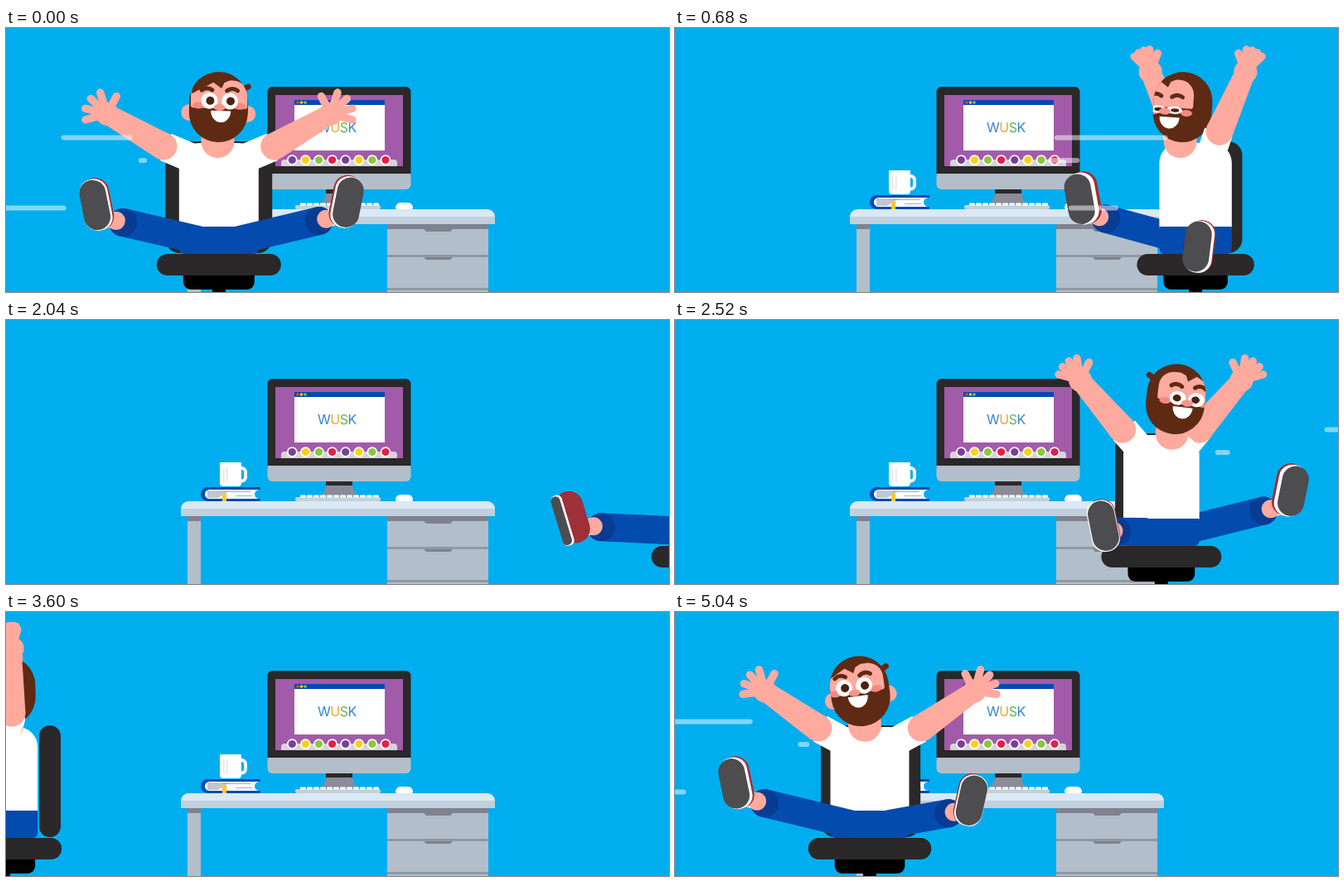
Write an HTML page with a canvas that moves like this. It is 800 px wide and 319 px high and loops after 5.08 s.

```html
<!DOCTYPE html>
<html lang="en">
<head>
<meta charset="utf-8">
<title>Office chair spin</title>
<style>
html, body { margin: 0; width: 100%; height: 100%; overflow: hidden; background: #00aeef; }
canvas { display: block; }
</style>
</head>
<body>
<canvas id="stage" width="800" height="319"></canvas>
<script>
const ctx = document.getElementById('stage').getContext('2d');
const LOOP = 5080, RAD = Math.PI / 180;
const SKY = '#00aeef', DARK = '#2a2829', BLUE = '#034bae', CUFF = '#073c92', SKIN = '#ffaa9f',
  HAIR = '#5e2a14', RED = '#9e3038', SOLE = '#4d4c4e', METAL = '#b2bfca';
const clamp = (v, lo, hi) => Math.min(hi, Math.max(lo, v));

function box(color, x, y, w, h, r = 0) {
  ctx.fillStyle = color;
  ctx.beginPath();
  ctx.roundRect(x, y, w, h, r);
  ctx.fill();
}

function oval(color, x, y, rx, ry = rx, from = 0, to = 2 * Math.PI) {
  ctx.fillStyle = color;
  ctx.beginPath();
  ctx.ellipse(x, y, rx, ry, 0, from, to);
  ctx.fill();
}

function poly(color, ...xy) {
  ctx.fillStyle = color;
  ctx.beginPath();
  for (let i = 0; i < xy.length; i += 2) ctx.lineTo(xy[i], xy[i + 1]);
  ctx.closePath();
  ctx.fill();
}

function line(color, width, x1, y1, x2, y2, cap = 'round') {
  ctx.strokeStyle = color;
  ctx.lineWidth = width;
  ctx.lineCap = cap;
  ctx.beginPath();
  ctx.moveTo(x1, y1);
  ctx.lineTo(x2, y2);
  ctx.stroke();
}

function drawMonitor() {
  box(DARK, 315.5, 71, 173, 112, 6);
  box(METAL, 315.5, 176, 173, 19, [0, 0, 6, 6]);
  box('#a15ba8', 325, 81, 154, 86);
  box('#fff', 348, 87, 109, 61);
  box(BLUE, 348, 87, 109, 6);
  ['#ef4136', '#fdd017', '#8cc63f'].forEach((c, i) => oval(c, 352 + i * 4.5, 90, 1.8));

  ctx.font = '400 16px Inter, sans-serif';
  let x = 376;
  [...'WUSK'].forEach((ch, i) => {
    ctx.fillStyle = ['#2f86d6', '#f2a51f', '#5cb848', '#2f86d6'][i];
    ctx.fillText(ch, x, 125.5);
    x += ctx.measureText(ch).width - 0.5;
  });

  box('#d6d4d8', 332, 159, 140, 8, [4, 4, 0, 0]);
  for (let i = 0; i < 8; i++) {
    oval('#fff', 345.3 + i * 16.1, 159.5, 6.3);
    oval(['#7a3f98', '#fdd017', '#8cc63f', '#e41f4b'][i % 4], 345.3 + i * 16.1, 159.5, 4.6);
  }

  poly('#8b8c98', 386, 199, 418, 199, 420, 208, 427, 213, 378, 213, 384, 208);
  box(DARK, 386, 195, 32, 5);
}

function drawDesk() {
  box(METAL, 219, 237, 16, 82);
  box('#80828f', 219, 237, 16, 6);
  box(METAL, 460, 237, 122, 82);
  box('#80828f', 460, 237, 122, 6);
  for (const y of [274, 314]) box('#8f98a4', 460, y, 122, 3);
  for (const y of [243, 277]) poly('#80828f', 504, y, 539, y, 536, y + 3, 507, y + 3);
  box('#dbe8f5', 211, 219, 379, 18, [9, 9, 0, 0]);
  box('#c0d0dc', 211, 228, 379, 9);

  box('#c6d0d9', 349, 214, 103, 5, 2);
  for (let x = 355; x < 447; x += 8) box('#fff', x, 211.5, 7, 3, 1);
  box('#fff', 470, 211, 21, 8, [9, 9, 3, 3]);

  box(BLUE, 235, 202, 72, 17, [9, 1, 1, 9]);
  box('#fff', 240, 205, 67, 11, [6, 0, 0, 6]);
  oval(SKY, 306, 210.5, 6, 5.5);
  poly('#c3c7cf', 243, 206, 270, 206, 256, 215, 243, 215);
  box('#aab0ba', 262, 207, 33, 1);
  box('#aab0ba', 277, 212, 20, 1);
  box('#fdc82f', 261, 209, 5, 10);

  ctx.strokeStyle = '#fff';
  ctx.lineWidth = 4;
  ctx.beginPath();
  ctx.roundRect(280, 179, 9, 15.5, 5);
  ctx.stroke();
  box('#fff', 258, 172, 26, 29, [1, 1, 4, 4]);
  box('#e2e6ea', 262, 178, 1.5, 18);
  box('#e2e6ea', 266, 178, 1.5, 18);
}

// side: -1 for his right limb, 1 for his left one; yaw 0 faces the viewer.
function drawLeg(yaw, side) {
  const c = Math.cos(yaw), s = Math.sin(yaw);
  const angle = yaw + side * 60 * RAD;
  const near = Math.max(0, -side * s), far = Math.max(0, side * s);
  const back = c < -0.5;
  const fx = (165 + 11 * c * c) * Math.sin(angle) * (1 - 0.15 * far) + 48 * near ** 3 * Math.sign(s);
  const fy = 207 + 40 * Math.max(0, Math.cos(angle)) ** 3 + 24 * near;
  const cx = fx * (back ? 0.9 : 0.78), cy = 233 + (fy - 211) * 0.6;

  const trouser = () => {
    line(BLUE, 34, side * 25 * c, 256, cx, cy);
    if (!back) oval(CUFF, cx, cy, 17);
  };
  const ankle = () => {
    const mx = cx + (fx - cx) * 0.25, my = cy + (fy - cy) * 0.1;
    line('#fff', 20, mx, my, fx, fy + 14, 'butt');
    oval(SKIN, mx, my, 11);
  };
  const shoe = () => {
    const out = clamp(fx / 60, -1, 1);
    const w = 10 + 22 * clamp((c + 0.4) / 0.9, 0, 1);
    const inward = -5 * (out * 0.5 + s * clamp(c + 0.4, 0, 1));
    ctx.save();
    ctx.translate(fx, fy);
    ctx.rotate((12 * fx / 165 + 14 * side * near * c) * RAD);
    box(RED, inward - 17, -33, 34, 64, 17);
    if (back) line('#fff', 1.2, out * 8, -18, out * 8, 24);
    else {
      const mid = out * (17 - w / 2);
      box('#fff', mid - w / 2 + inward * 0.6 - 1, -32, w + 2, 63, Math.min(17, w / 2));
      box(SOLE, mid - w / 2, -31, w, 61, Math.min(16, w / 2));
    }
    ctx.restore();
  };
  (back ? [shoe, ankle, trouser] : [trouser, ankle, shoe]).forEach(part => part());
}

function drawArm(yaw, side) {
  const c = Math.cos(yaw), s = Math.sin(yaw), a = Math.abs(c);
  const dir = side * (c < 0 ? -1 : 1), shift = -10 * s ** 5, fromBack = c < -0.4;
  const sx = dir * 67 * a ** 2 + shift, sy = 122 + 21 * a ** 4;
  const hx = dir * 135 * a ** 1.8 + shift, hy = 44 + 60 * a ** 4;
  const aim = Math.atan2(hy - sy, hx - sx);
  const sleeve = () => line('#fff', 35, dir * 26 * a, 160, sx * 0.96, sy + 1, fromBack ? 'round' : 'butt');

  if (!fromBack) sleeve();
  const nx = -Math.sin(aim), ny = Math.cos(aim);
  oval(SKIN, sx, sy, 16.5);
  poly(SKIN, sx + nx * 16.5, sy + ny * 16.5, hx + nx * 12, hy + ny * 12,
    hx - nx * 12, hy - ny * 12, sx - nx * 16.5, sy - ny * 16.5);
  oval(SKIN, hx, hy, 14);
  const fan = 0.2 + 0.8 * a * a;
  for (const deg of [-45, -16, 13, 42, 88]) {
    const f = aim - dir * deg * fan * RAD, len = deg > 80 ? 24 : 27;
    line(SKIN, 9.5, hx, hy, hx + len * Math.cos(f), hy + len * Math.sin(f));
  }
  if (fromBack) sleeve();
}

function drawHead(yaw) {
  const c = Math.cos(yaw), s = Math.sin(yaw), deg = Math.atan2(s, c) / RAD;
  const around = d => 36 * Math.sin(clamp(d, -90, 90) * RAD);
  const ears = front => [-1, 1].forEach(side => {
    const z = -side * s;
    if (front ? c < 0 && z > 0.3 : Math.abs(z) < 0.4) oval(SKIN, side * 35 * c, 103, 10);
  });

  ctx.save();
  ctx.translate(15 * Math.sin(2 * yaw) - 2, 110);
  ctx.rotate(9 * RAD * Math.sin(4 * yaw));
  ctx.translate(0, -110);
  box(SKIN, -20, 115, 40, 42, [0, 0, 20, 20]);
  ears(false);
  if (c > 0.8) line(HAIR, 7, 28, 74, 35, 70);
  box(HAIR, -35.5, 53, 71, 85, 35.5);

  ctx.save();
  ctx.clip();
  const left = around(deg - 72), right = around(deg + 72);
  const corner = Math.min(18, (right - left) / 2);
  if (right - left > 1) box(SKIN, left, 63, right - left, 34, [corner, corner, 3, 3]);
  if (c > 0.1) {
    const turn = deg * 0.7, drop = 14 * s * s, open = clamp((c - 0.5) * 2.5, 0.45, 1);
    const middle = around(turn);
    poly(HAIR, middle - 32, 60, middle + 18, 60, middle + 5, 66, middle + 2, 73, middle - 8, 66, middle - 34, 80);
    for (const side of [-1, 1]) {
      const x = around(turn + side * 20), y = 88 + drop * 1.4;
      oval('#f48a80', around(turn + side * 44), 94 + drop, 7, 4);
      oval('#fff', x, y, 10, 10 * open);
      oval('#4a2113', x + 1, y, 5, 5 * open);
      ctx.strokeStyle = HAIR;
      ctx.lineWidth = 5;
      ctx.lineCap = 'round';
      ctx.beginPath();
      ctx.arc(x + side * 3, 83 + drop, 10, -2.3, -0.9);
      ctx.stroke();
    }
    oval('#f9958b', middle, 96 + drop * 0.7, 7, 4);
    oval('#fff', middle * 0.8 + 2, 100 + drop, 12, 14, 0, Math.PI);
  }
  ctx.restore();
  ears(true);
  ctx.restore();
}

function drawMan(yaw) {
  const c = Math.cos(yaw), s = Math.sin(yaw), a = Math.abs(c), sides = [-1, 1];
  const backrest = () => {
    const w = 26 + 103 * a ** 2.4;
    box(DARK, -56 * s ** 3 - w / 2, 137, w, 135, Math.min(17, w / 2));
  };
  const seat = () => box(DARK, -70 - 5 * a ** 4, 273, 140 + 10 * a ** 4, 26, 13);
  const legs = front => sides.forEach(side => {
    if ((Math.cos(yaw + side * 60 * RAD) >= 0) === front) drawLeg(yaw, side);
  });
  const arms = layer => sides.forEach(side => {
    const z = -side * s;
    if ((z > 0.3) - (z < -0.3) === layer) drawArm(yaw, side);
  });

  box('#000', -8, 310, 16, 12);
  box('#000', -38 - 5 * a ** 4, 290, 76 + 10 * a ** 4, 26, 9);
  if (c >= 0) backrest();
  arms(-1);
  legs(false);
  const half = 41 + 7 * a ** 2;
  box('#fff', -half, 139, 2 * half, 103, [24, 24, 0, 0]);
  box(BLUE, -half, 240, 2 * half, 33, [0, 0, 6, 6]);
  arms(0);
  drawHead(yaw);
  arms(1);
  if (c < 0) {
    legs(true);
    backrest();
    seat();
  } else {
    seat();
    legs(true);
  }
}

// y, resting x, arrival time, tail delay, ease power, distance factor
const STREAKS = [
  [132.5, 274, 1196, 52, 4, 0.512],
  [217.5, 401, 1147, 50, 1.5, 51.5],
  [160, 169, 832, 25, 2, 19.3],
  [160, 456, 1230, 45, 1.5, 60.7],
  [160, 574, 1610, 30, 1.5, 60.7],
  [132.5, 697, 1630, 106, 1.5, 58],
  [217.5, 640, 1620, 43, 1.5, 66]
];

function drawStreaks(time) {
  for (const [y, end, arrive, delay, power, reach] of STREAKS) {
    if (time < arrive - 500 || time > arrive + delay) continue;
    const at = t => end - reach * (Math.max(0, arrive - t) / 100) ** power;
    line('rgba(255,255,255,.5)', 6, at(time - delay), y, at(time), y);
  }
}

function drawPass(time, mirrored) {
  if (time < 0 || time > 2160) return;
  ctx.save();
  if (mirrored) ctx.transform(-1, 0, 0, 1, 800, 0);
  ctx.save();
  ctx.translate(-180.5 + 0.546 * time, 0);
  drawMan((2 + 0.45 * (time - 800)) * RAD);
  ctx.restore();
  drawStreaks(time);
  ctx.restore();
}

function frame() {
  const t = performance.now() % LOOP;
  box(SKY, 0, 0, 800, 319);
  drawMonitor();
  drawDesk();
  drawPass((t - 4280 + LOOP) % LOOP, false);
  drawPass(t - 1800, true);
  requestAnimationFrame(frame);
}
frame();
</script>
</body>
</html>
```
